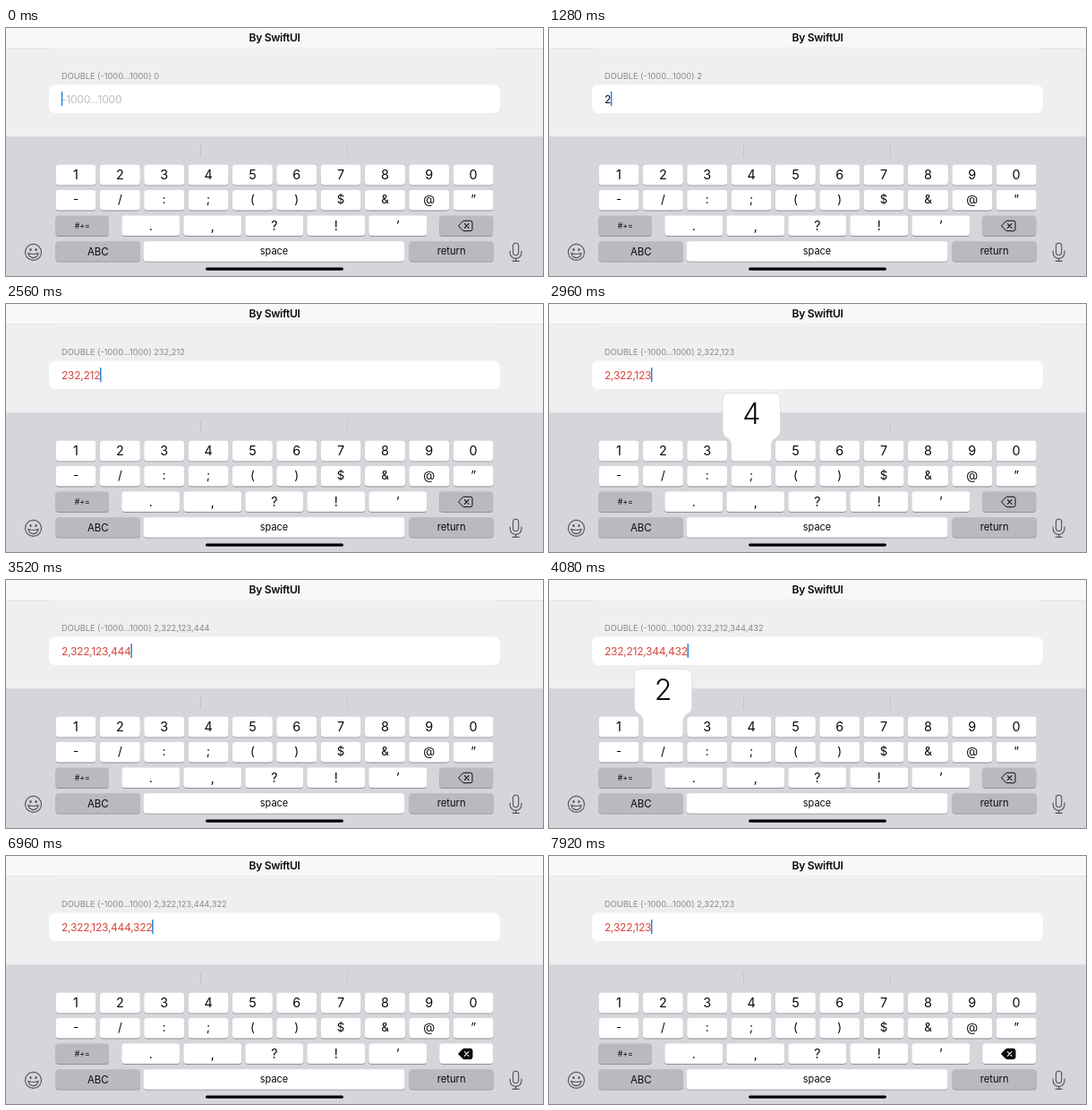
Animation of 600x277 px, one loop 8000 ms. Source, as an HTML page:

```html
<!DOCTYPE html>
<html lang="en">
<head>
<meta charset="utf-8">
<title>Number field</title>
<style>
  html, body { margin: 0; width: 100%; height: 100%; overflow: hidden; background: #efeff1; }
  svg { display: block; width: 600px; height: 277px; font-family: Inter, "Open Sans", sans-serif; }
</style>
</head>
<body>
<svg id="stage" viewBox="0 0 600 277" xmlns="http://www.w3.org/2000/svg"></svg>
<script>
const LOOP = 8000, STEP = 80, TEXT_X = 62;
const WHITE = '#fff', GRAY = '#b9bac0', INK = '#0a0a0a', ICON = '#505358';
const stage = document.getElementById('stage');

// [touch down, touch up, digit]; the digit is entered on release.
const TAPS = [
  [1120, 1280, 2], [1360, 1520, 3], [1680, 1760, 2], [1840, 2080, 2],
  [2160, 2320, 1], [2400, 2560, 2], [2720, 2880, 3],
  [2960, 3120, 4], [3200, 3280, 4], [3360, 3520, 4],
  [3600, 3760, 3], [3840, 3920, 2], [4080, 4240, 2]
];
const DELETE_DOWN = 6960, DELETE_FIRST = 7040, DELETE_EVERY = 160;

// Caret blinks: [fade out from, hidden at, fade in from, visible at]
const BLINKS = [
  [0, 320, 400, 560],
  [4560, 4880, 4960, 5120],
  [5520, 5760, 5840, 6080],
  [6480, 6800, 6880, 6960]
];

function add(tag, attrs, parent = stage) {
  const node = document.createElementNS('http://www.w3.org/2000/svg', tag);
  for (const name in attrs) node.setAttribute(name, attrs[name]);
  return parent.appendChild(node);
}

function box(x, y, width, height, fill, rx = 0, parent = stage) {
  return add('rect', { x, y, width, height, fill, rx }, parent);
}

function label(content, x, y, size, attrs = {}, parent = stage) {
  const node = add('text', { x, y, 'font-size': size, fill: INK, ...attrs }, parent);
  node.textContent = content;
  return node;
}

const centered = { 'text-anchor': 'middle' };

function key(x, y, width, content, size, fill = WHITE, drop = 0) {
  box(x, y + 0.8, width, 22.6, '#8e9095', 3.6);
  const cap = box(x, y, width, 22.6, fill, 3.6);
  if (content) label(content, x + width / 2, y + 11.2 + size * 0.364 + drop, size, centered);
  return cap;
}

// Form, with the previous row just showing under the navigation bar
box(0, 0, 600, 277, '#efeff1');
box(48, 0, 504, 23.4, WHITE, 7);
box(0, 0, 600, 22.3, '#f8f8fa');
box(0, 22, 600, 0.6, '#dcdcdf');
label('By SwiftUI', 300, 14.5, 12.1, { ...centered, 'font-weight': 600, 'letter-spacing': -0.3 });
const caption = label('', TEXT_X, 56.5, 9.25, { fill: '#88888c' });
box(48, 63.6, 504, 31.4, WHITE, 7);
const placeholder = label('-1000...1000', TEXT_X, 83.8, 12.1, { fill: '#bebec1', 'letter-spacing': -0.25 });
const value = label('', TEXT_X, 83.8, 12.1, { 'letter-spacing': -0.31 });
const caret = box(TEXT_X, 71, 1.5, 16, '#2583e3', 0.6);

// Keyboard
box(0, 121.3, 600, 155.7, '#d5d6db');
for (const x of [217, 381]) box(x, 130, 0.8, 13.5, '#bfc1c6');

const keyX = i => 55.5 + 49.35 * i;
const KEY_W = 45, TOP = 152.8;
[...'1234567890'].forEach((c, i) => key(keyX(i), TOP, KEY_W, c, 14.4));
[...'-/:;()$&@”'].forEach((c, i) => key(keyX(i), 181, KEY_W, c, 13.4, WHITE, -0.8));
key(55.5, 209.5, 59.5, '#+=', 8.8, GRAY);
[...'.,?!’'].forEach((c, i) => key(129.3 + 69 * i, 209.5, 65, c, 14.2));
const deleteKey = key(484.2, 209.5, 60, '', 0, GRAY);
key(55.5, 238.2, 94.5, 'ABC', 11.4, GRAY, 0.6);
key(153.5, 238.2, 292, 'space', 11, WHITE, -0.6);
key(450.6, 238.2, 94, 'return', 11.2, GRAY, -0.6);

// Delete symbol
const deleteShape = add('path', {
  d: 'M505.5 221 L510.3 216 Q511 215.3 512 215.3 H518.8 Q521 215.3 521 217.5 V224.5 Q521 226.7 518.8 226.7 H512 Q511 226.7 510.3 226 Z',
  stroke: INK, 'stroke-width': 1, 'stroke-linejoin': 'round'
});
const deleteCross = add('path', {
  d: 'M512.4 218.7 l4.6 4.6 m0 -4.6 l-4.6 4.6', 'stroke-width': 1.1, 'stroke-linecap': 'round'
});

// Smiley, microphone and home indicator
const line = { fill: 'none', stroke: ICON, 'stroke-width': 1.1, 'stroke-linecap': 'round' };
add('circle', { cx: 30.5, cy: 250.4, r: 9, ...line });
for (const cx of [27.5, 33.5]) add('ellipse', { cx, cy: 247.6, rx: 1.1, ry: 1.6, fill: ICON });
add('path', { ...line, d: 'M24.8 251.4 Q30.5 253.6 36.2 251.4 Q35 256.6 30.5 256.6 Q26 256.6 24.8 251.4 Z', 'stroke-linejoin': 'round' });
add('rect', { x: 566.5, y: 240.3, width: 6.2, height: 13.4, rx: 3.1, ...line });
add('path', { ...line, d: 'M563.2 249 V251 A6.4 6.4 0 0 0 576 251 V249 M569.6 257.4 V260.4 M566 260.4 H573.2' });
box(223, 267.4, 154, 3.4, '#000', 1.7);

// Enlarged key shown while a digit is held
const popup = add('g', {});
const popupShape = add('path', { fill: WHITE, stroke: '#c6c8cd', 'stroke-width': 0.5 }, popup);
const popupDigit = label('', 0, 134.2, 32, { ...centered, 'font-weight': 300 }, popup);

function drawPopup(digit) {
  popup.style.display = digit ? '' : 'none';
  if (!digit) return;
  const x = keyX(digit - 1), end = x + KEY_W;
  const left = digit === 1 ? x : x - 9.5, right = left + 64.4;
  popupShape.setAttribute('d',
    `M${left + 7} 99.5 H${right - 7} Q${right} 99.5 ${right} 106.5 V142` +
    `C${right} 150 ${end} 149 ${end} 157 V172 Q${end} 175.5 ${end - 3.5} 175.5` +
    `H${x + 3.5} Q${x} 175.5 ${x} 172 V157 C${x} 149 ${left} 150 ${left} 142` +
    `V106.5 Q${left} 99.5 ${left + 7} 99.5 Z`);
  popupDigit.setAttribute('x', (left + right) / 2);
  popupDigit.textContent = digit;
}

function caretOpacity(t) {
  const blink = BLINKS.find(b => t >= b[0] && t < b[3]);
  if (!blink) return 1;
  const [out, hidden, back, shown] = blink;
  if (t < hidden) return 1 - (t - out) / (hidden - out);
  return Math.max(0, (t - back) / (shown - back));
}

function render(t) {
  const typed = TAPS.filter(tap => t >= tap[1]).map(tap => tap[2]);
  const deleted = t < DELETE_FIRST ? 0 : Math.floor((t - DELETE_FIRST) / DELETE_EVERY) + 1;
  const digits = typed.slice(0, typed.length - deleted).join('');
  const number = Number(digits), formatted = number.toLocaleString('en-US');

  caption.textContent = `DOUBLE (-1000...1000) ${formatted}`;
  placeholder.style.display = digits ? 'none' : '';
  value.textContent = digits ? formatted : '';
  value.setAttribute('fill', number > 1000 ? '#d8473d' : INK);
  caret.setAttribute('x', TEXT_X - 0.2 + (digits ? value.getComputedTextLength() : 0));
  caret.setAttribute('opacity', caretOpacity(t));

  const held = TAPS.find(tap => t >= tap[0] && t < tap[1]);
  drawPopup(held && held[2]);

  const pressed = t >= DELETE_DOWN;
  deleteKey.setAttribute('fill', pressed ? WHITE : GRAY);
  deleteShape.setAttribute('fill', pressed ? INK : 'none');
  deleteCross.setAttribute('stroke', pressed ? WHITE : INK);
}

const start = performance.now();
function tick() {
  const t = (performance.now() - start) % LOOP;
  render(Math.floor(t / STEP) * STEP);
  requestAnimationFrame(tick);
}
tick();
</script>
</body>
</html>
```
